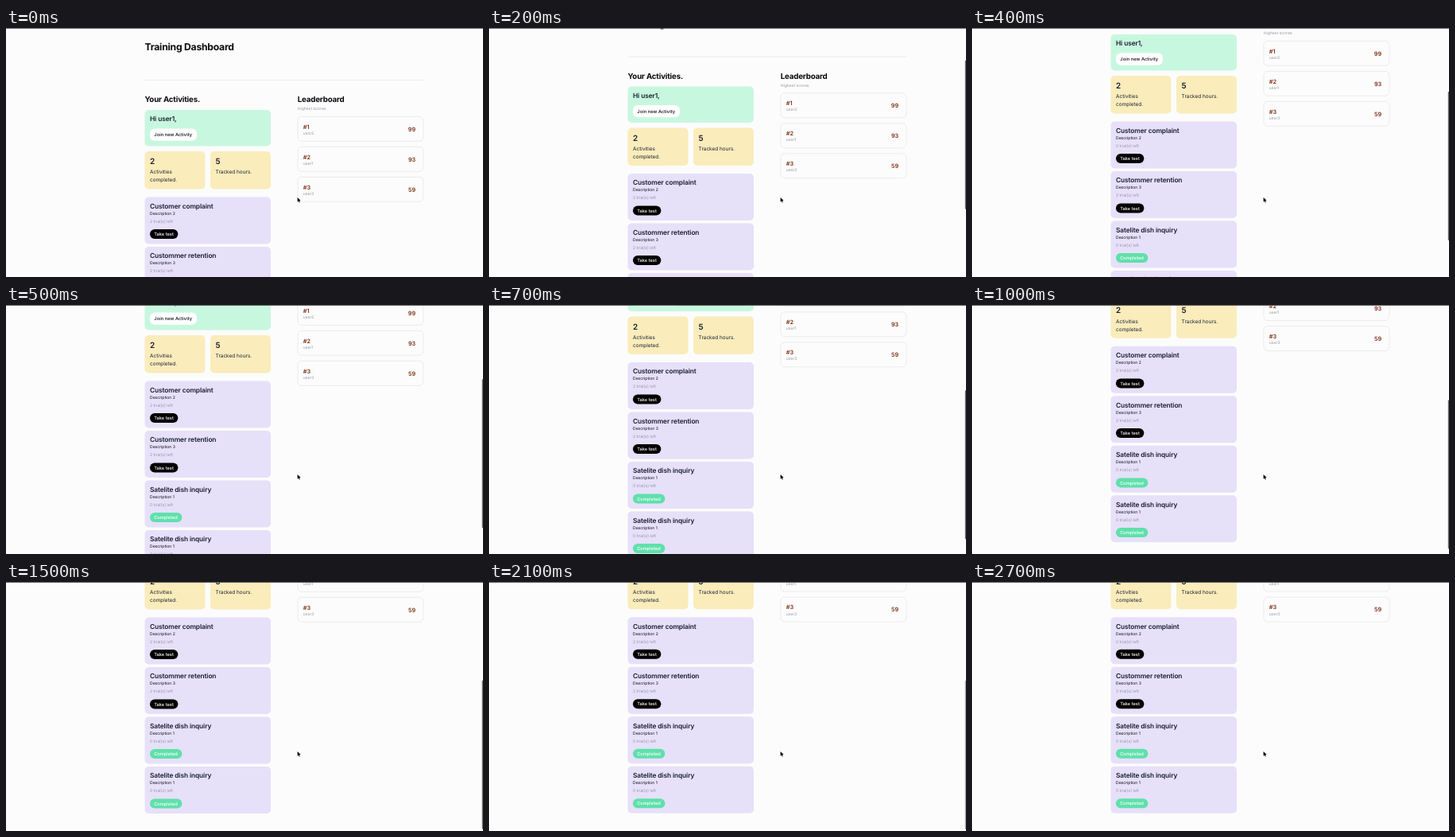
These frames come from a looping animation (600x313 px, 2.8 s). An HTML page with a canvas:

```html
<!DOCTYPE html>
<html lang="en">
<head>
<meta charset="utf-8">
<title>Training Dashboard</title>
<style>
  html, body { margin: 0; width: 100%; height: 100%; overflow: hidden; background: #fcfcfc; }
  canvas { display: block; width: 600px; height: 313px; }
</style>
</head>
<body>
<canvas id="stage"></canvas>
<script>
const WIDTH = 600, HEIGHT = 313, LOOP = 2800, STEP = 100;
const INK = '#0b0b0f', SLATE = '#1a2030', MUTED = '#959aa5', RUST = '#7c2d12', RULE = '#e7e8eb';

const canvas = document.getElementById('stage');
const ctx = canvas.getContext('2d');
const ratio = window.devicePixelRatio || 1;
canvas.width = WIDTH * ratio;
canvas.height = HEIGHT * ratio;

const activities = [
  { title: 'Customer complaint', description: 'Description 2', trials: 2 },
  { title: 'Custommer retention', description: 'Description 3', trials: 2 },
  { title: 'Satelite dish inquiry', description: 'Description 1', trials: 0 },
  { title: 'Satelite dish inquiry', description: 'Description 1', trials: 0 }
];
const leaders = [['user2', 99], ['user1', 93], ['user3', 59]];

// Scroll position at each step: a quick flick, then inertia.
const scrollPath = [0, 6, 29.5, 63, 95, 117, 130.5, 140.5, 148.2, 155, 160.7,
  163.6, 165.5, 166.8, 167.6, 168, 168.2, 168.3];

const scrollAt = time => scrollPath[Math.min(Math.floor(time / STEP), scrollPath.length - 1)];

function text(value, x, y, size, weight, color, spacing = 0) {
  ctx.font = `${weight} ${size}px Inter, sans-serif`;
  ctx.letterSpacing = `${spacing * size}px`;
  ctx.fillStyle = color;
  ctx.fillText(value, x, y);
}

function box(x, y, width, height, radius, fill, stroke) {
  ctx.beginPath();
  ctx.roundRect(x, y, width, height, radius);
  ctx.fillStyle = fill;
  ctx.fill();
  if (stroke) {
    ctx.strokeStyle = stroke;
    ctx.lineWidth = 0.8;
    ctx.stroke();
  }
}

function drawHeader() {
  text('Training Dashboard', 174.5, 28.3, 12.2, 700, INK, -0.02);
  ctx.fillStyle = RULE;
  ctx.fillRect(174.5, 65.2, 350.5, 0.8);
  text('Your Activities.', 174.5, 93.2, 9.75, 700, INK, -0.02);
  text('Leaderboard', 366.8, 93.2, 9.75, 700, INK, -0.02);
  text('Highest scores.', 366.8, 103, 5.05, 400, MUTED);
}

function drawGreeting() {
  box(174.5, 103, 158.5, 45.5, 5, '#c8f7e0');
  text('Hi user1,', 181, 117.2, 8.4, 600, SLATE, -0.015);
  box(181, 126.5, 59, 15.2, 6, '#fff');
  text('Join new Activity', 186.3, 136.2, 5.83, 500, INK);
}

function drawStat(x, value, lines) {
  box(x, 155, 76, 47.5, 5, '#faecbb');
  text(value, x + 6.5, 171, 10, 600, SLATE);
  lines.forEach((line, i) => text(line, x + 6.6, 183.2 + i * 10, 6.45, 400, SLATE));
}

function drawActivity({ title, description, trials }, index) {
  const y = 212.5 + index * 62.5;
  const open = trials > 0;
  box(174.5, y, 158.5, 59, 5, '#e6e0f9');
  text(title, 181, y + 14.4, 8.4, 600, SLATE, -0.015);
  text(description, 181, y + 22.4, 5.05, 400, INK);
  text(`${trials} trial(s) left`, 181, y + 32.4, 5.1, 400, MUTED);
  box(181, y + 40.6, open ? 35.4 : 40.4, 12, 6, open ? '#000' : '#5fe0ab');
  text(open ? 'Take test' : 'Completed', 186.2, y + 48.7, 5.7, 500, '#fff');
}

function drawLeader([name, score], index) {
  const y = 111.3 + index * 38;
  box(366.9, y, 158, 31, 5, '#fcfcfc', RULE);
  text(`#${index + 1}`, 373.8, y + 15.3, 7.3, 600, RUST);
  text(name, 373.8, y + 22.6, 5.05, 400, MUTED);
  ctx.textAlign = 'right';
  text(score, 515.2, y + 18.4, 7.3, 600, RUST);
  ctx.textAlign = 'left';
}

function drawScrollbar(time, scroll) {
  if (time < STEP) return;
  const fade = Math.floor((time - 1900) / STEP) / 5;
  const opacity = 1 - Math.min(Math.max(fade, 0), 1);
  box(598.8, 23 + scroll * 0.6, 1.6, 187, 0.8, `rgba(60, 60, 60, ${0.8 * opacity})`);
}

function drawPointer() {
  ctx.beginPath();
  [[0, 0], [0, 5.8], [1.3, 4.6], [2.2, 6.6], [3.2, 6.2], [2.3, 4.2], [4.1, 4.1]]
    .forEach(([x, y]) => ctx.lineTo(366.6 + x, 213 + y));
  ctx.closePath();
  ctx.lineJoin = 'round';
  ctx.lineWidth = 0.9;
  ctx.strokeStyle = '#fff';
  ctx.stroke();
  ctx.fillStyle = '#000';
  ctx.fill();
}

function draw(time) {
  const scroll = scrollAt(time);
  ctx.setTransform(ratio, 0, 0, ratio, 0, 0);
  ctx.textRendering = 'geometricPrecision';
  ctx.fillStyle = '#fcfcfc';
  ctx.fillRect(0, 0, WIDTH, HEIGHT);

  ctx.save();
  ctx.translate(0, -scroll);
  drawHeader();
  drawGreeting();
  drawStat(174.5, '2', ['Activities', 'completed.']);
  drawStat(257, '5', ['Tracked hours.']);
  activities.forEach(drawActivity);
  leaders.forEach(drawLeader);
  ctx.restore();

  ctx.fillStyle = '#5a5a5a';
  ctx.fillRect(0, 0, WIDTH, 0.9);
  drawScrollbar(time, scroll);
  drawPointer();
}

const start = performance.now();
function tick() {
  draw((performance.now() - start) % LOOP);
  requestAnimationFrame(tick);
}
tick();
</script>
</body>
</html>
```
